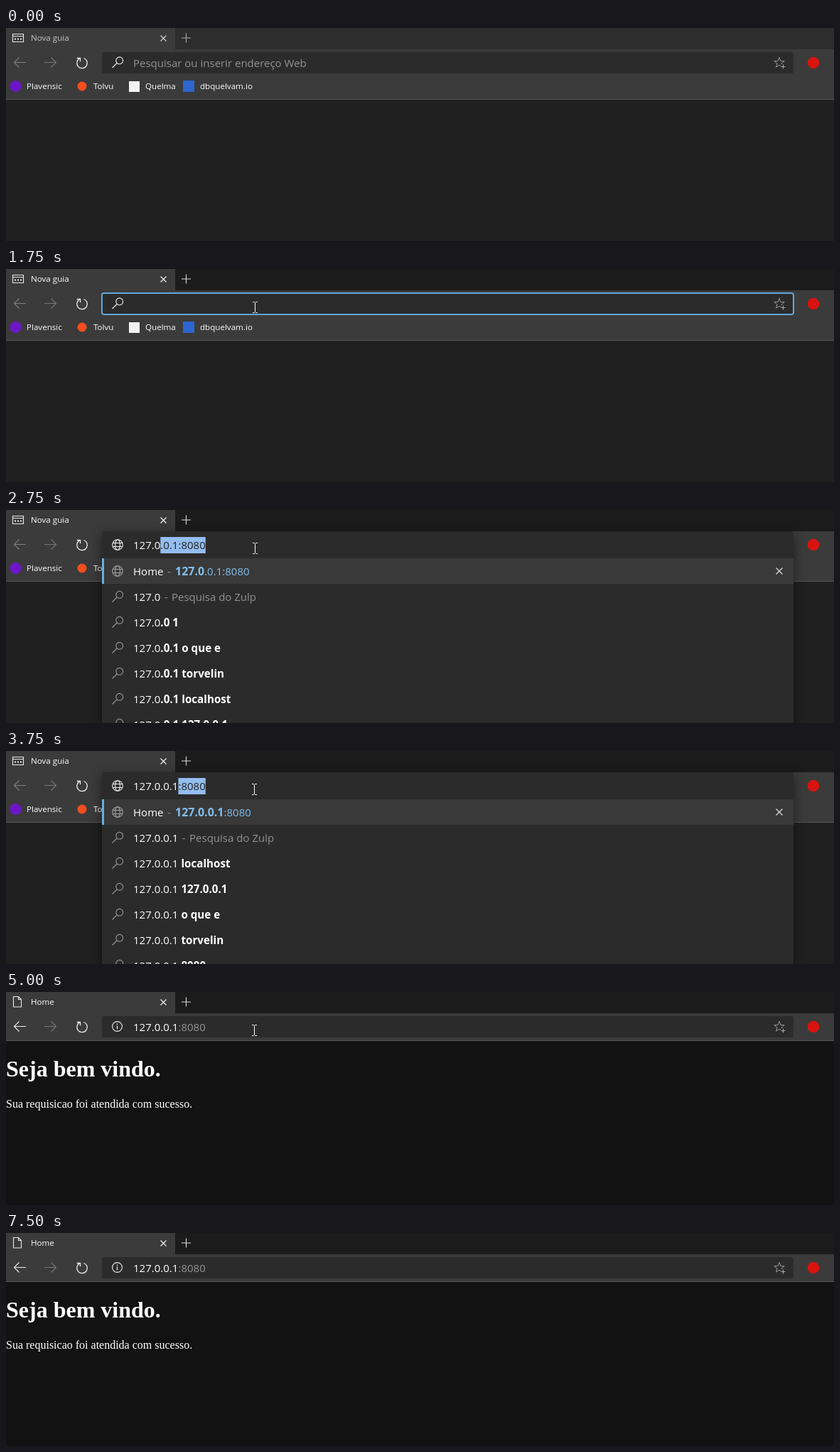
Animation of 1165x300 px, one loop 8 s. Source, as an HTML page:

```html
<!DOCTYPE html>
<html lang="pt">
<head>
<meta charset="utf-8">
<title>Nova guia</title>
<style>
  html, body { margin: 0; width: 100%; height: 100%; overflow: hidden; background: #202020; }
  svg { display: block; }
  text { font: 15px "Open Sans", "Noto Sans", sans-serif; fill: #fff; white-space: pre; }
  .small { font-size: 11.6px; }
  .bold { font-size: 15.2px; font-weight: 700; }
  .link { fill: #83bfee; }
  .link.bold { font-size: 16px; }
  .dim { fill: #929292; }
  .serif { font-family: "Liberation Serif", serif; font-size: 16px; }
  .title { font-size: 32px; font-weight: 700; }
  .menu { filter: drop-shadow(0 4px 8px rgba(0, 0, 0, .5)); }
</style>
</head>
<body>
<svg id="stage" width="1165" height="300" viewBox="0 0 1165 300"></svg>
<script>
const LOOP = 8000;
const HOST = '127.0.0.1', PORT = ':8080', URL_TEXT = HOST + PORT;
const stage = document.getElementById('stage');

const withHost = words => words.map(w => HOST + ' ' + w);
const early = ['127.0.0 1', ...withHost(['o que e', 'torvelin', 'localhost', HOST])];
const middle = [HOST, ...withHost(['8080', 'o que e', 'localhost', HOST])];
const late = withHost(['localhost', HOST, 'o que e', 'torvelin', '8080']);

const arrow = (x, y) => ({ kind: 'arrow', x, y });
const beam = (x, y) => ({ kind: 'beam', x, y });

// Each step changes the state left by the one before it.
const steps = [
  [0, { active: false, hover: false, focus: false, caret: false, typed: '', list: null,
        loading: false, loaded: false, pointer: null }],
  [500, { pointer: arrow(423, 185) }],
  [750, { pointer: beam(366, 57), hover: true }],
  [1000, { pointer: beam(340, 54) }],
  [1250, { pointer: beam(350, 54), hover: false, active: true, focus: true, caret: true }],
  [1750, { caret: false }],
  [2250, { typed: '1', list: [HOST, HOST + ' localhost'] }],
  [2500, { typed: '127' }],
  [2750, { typed: '127.0', list: early }],
  [3000, { typed: '127.0.' }],
  [3250, { typed: '127.0.0.' }],
  [3500, { list: middle }],
  [3750, { typed: HOST, list: late, pointer: beam(349, 54) }],
  [4000, { list: withHost(['8080', HOST, 'localhost']) }],
  [4250, { typed: URL_TEXT, list: [], caret: true }],
  [4750, { loading: true, caret: false }],
  [5000, { loading: false, loaded: true, list: null, focus: false }],
  [6500, { pointer: beam(352, 60), hover: true }],
  [6750, { pointer: arrow(361, 115), hover: false }],
  [7000, { pointer: arrow(450, 219) }],
  [7250, { pointer: null }]
];

let last = {};
const states = steps.map(([at, change]) => (last = { ...last, ...change, at }));

const box = (x, y, w, h, fill, extra = '') =>
  `<rect x="${x}" y="${y}" width="${w}" height="${h}" fill="${fill}" ${extra}/>`;
const dot = (x, y, r, fill) => `<circle cx="${x}" cy="${y}" r="${r}" fill="${fill}"/>`;
const line = (d, color, width = 1.1) =>
  `<path d="${d}" fill="none" stroke="${color}" stroke-width="${width}"/>`;
const text = (x, y, body, cls = '', extra = '') =>
  `<text x="${x}" y="${y}" class="${cls}" ${extra}>${body}</text>`;
const span = (body, cls) => `<tspan class="${cls}">${body}</tspan>`;
const dash = '<tspan class="dim" dx="1.5"> - </tspan>';

const cross = (x, y, r, color) =>
  line(`M${x - r} ${y - r}l${2 * r} ${2 * r}m0 ${-2 * r}l${-2 * r} ${2 * r}`, color, 1.2);
const lens = (x, y, color) =>
  line(`M${x - 1} ${y + 1}L${x - 7.5} ${y + 7.5}`, color) +
  `<circle cx="${x + 2.7}" cy="${y - 2.7}" r="4.9" fill="none" stroke="${color}" stroke-width="1.1"/>`;
const globe = (x, y, color) =>
  `<g fill="none" stroke="${color}" stroke-width="1.1"><circle cx="${x}" cy="${y}" r="7.3"/>` +
  `<ellipse cx="${x}" cy="${y}" rx="3.4" ry="7.3"/>` +
  `<path d="M${x - 6.8} ${y - 2.5}h13.6m0 5h-13.6"/></g>`;
const info = (x, y) =>
  `<circle cx="${x}" cy="${y}" r="6.9" fill="none" stroke="#eee" stroke-width="1.1"/>` +
  line(`M${x} ${y - 1}v4.8m0 -7.8v1.6`, '#eee', 1.3);

function star(x, y) {
  let d = '';
  for (let i = 0; i < 10; i++) {
    const r = i % 2 ? 3.2 : 7.6, a = (i / 5 - 0.5) * Math.PI;
    d += (i ? 'L' : 'M') + (x + r * Math.cos(a)).toFixed(1) + ' ' + (y + r * Math.sin(a)).toFixed(1);
  }
  return line(d + 'Z', '#999', 1) + box(x + 2.5, y + 2, 6, 6.5, '#2b2b2b') +
    line(`M${x + 5.5} ${y + 2.5}v6m-3 -3h6`, '#aaa');
}

function tabs(s) {
  const ink = s.active ? '#fff' : '#c8c8c8';
  let out = box(0, 0, 1165, 30, s.active ? '#1b1b1b' : '#2d2d2d') + box(0, 0, 238, 30, '#3b3b3b');
  if (s.loaded) out += line('M10.5 6.5h7l4 4v10.500h-11zM17.500 6.500v4h4', '#e8e8e8');
  else if (!s.loading)
    out += line('M9.5 8.500h15v11h-15zM9.500 11.500h15', '#e8e8e8') +
      [13, 17, 21].map(x => box(x - 1, 14.5, 2, 2, '#e8e8e8')).join('');
  return out + text(35, 18, s.loaded ? 'Home' : 'Nova guia', 'small', `style="fill:${ink}"`) +
    cross(221.5, 14.5, 4, s.active ? '#eee' : '#ccc') +
    line('M253.500 7.500v13m-6.500 -6.500h13', s.active ? '#ddd' : '#aaa');
}

function toolbar(s) {
  const end = s.loaded ? 68 : 100;
  let out = box(0, 30, 1165, end - 30, '#3b3b3b') + box(0, end, 1165, 1, '#575757') +
    line('M28 48.500H11.500m7 -7l-7 7l7 7', s.loaded ? '#f0f0f0' : '#808080') +
    line('M54 48.500h16.500m-7 -7l7 7l-7 7', '#777');
  out += s.loading ? cross(107, 49, 5.5, '#eee')
    : line('M109.500 42.500A7.300 7.300 0 1 1 103.500 43M99.800 42.500h4.700v4.700', '#eee', 1.3);
  return out + dot(1136, 49, 8.3, '#d8140f');
}

function bookmarks() {
  return dot(13.5, 82, 8, '#6d16c9') + text(29, 86, 'Plavensic', 'small') +
    dot(107, 82, 6.5, '#f24e1e') + text(123, 86, 'Tolvu', 'small') +
    box(173, 75, 15, 15, '#f2f2f2') + text(196, 86, 'Quelma', 'small') +
    box(249, 74, 16, 16, '#2b67cf') + text(273, 86, 'dbquelvam.io', 'small');
}

function suggestion(item, i, typed) {
  let n = 0;
  while (n < typed.length && item[n] === typed[n]) n++;
  const y = 158 + 36 * i;
  return lens(157, y, '#999') + text(179, y + 5.5, item.slice(0, n) + span(item.slice(n), 'bold'));
}

function menu(s) {
  const bottom = 148 + 36 * s.list.length;
  return box(135, 30, 973, bottom - 30, '#2b2b2b', 'rx="3" class="menu"') +
    box(135, 68, 973, 36, '#393939') + box(135, 68, 3, 36, '#69aede') +
    globe(157, 86, '#a0a0a0') + text(179, 91.5, 'Home' + dash) +
    text(238, 91.5, span(s.typed, 'link bold') + span(URL_TEXT.slice(s.typed.length), 'link')) +
    cross(1088, 86, 4.5, '#ddd') +
    lens(157, 122, '#999') + text(179, 127.5, s.typed + dash + span('<tspan dx="1.5">Pesquisa</tspan> do Zulp', 'dim')) +
    s.list.map((item, i) => suggestion(item, i, s.typed)).join('');
}

function addressBar(s) {
  let out = '';
  if (s.list) out += menu(s);
  else if (s.focus) out += box(135, 34, 973, 30, '#2b2b2b', 'rx="3" stroke="#62a8db" stroke-width="2"');
  else out += box(135, 34, 973, 30, s.hover ? '#333' : '#2b2b2b', 'rx="3"');

  if (s.loading || s.loaded) out += info(156.5, 48.5) + text(179, 55, HOST + span(PORT, 'dim'));
  else if (s.list)
    out += globe(157, 49, '#f0f0f0') + '<rect id="mark" y="38" height="23" fill="#94bdf0"/>' +
      text(179, 55, `<tspan id="typed">${s.typed}</tspan>` +
        `<tspan id="rest" fill="#222">${URL_TEXT.slice(s.typed.length)}</tspan>`);
  else {
    out += lens(157, 48.5, '#eee');
    if (!s.focus) out += text(179, 55, 'Pesquisar ou inserir endereço Web', 'dim');
  }
  if (!s.list || s.loading) out += star(1088, 49);
  if (s.caret) out += box(s.typed ? 280 : 179, 37, 1, 22, '#fff');
  return out;
}

function page(s) {
  if (!s.loaded) return box(0, 101, 1165, 199, '#202020');
  return box(0, 69, 1165, 231, '#121212') +
    text(0, 119, 'Seja bem vindo.', 'serif title') +
    text(0, 163, 'Sua requisicao foi atendida com sucesso.', 'serif');
}

function pointer(p) {
  if (!p) return '';
  const shape = p.kind === 'arrow'
    ? '<path d="M.5 .5V16.500L4.200 13L6.700 18.500L9 17.500L6.600 12H11.500Z" fill="#fff" stroke="#000"/>'
    : line('M-3 -7.500h2.500l1 1l1 -1h2.500M.5 -6.500v13M-3 7.500h2.500l1 -1l1 1h2.500', '#fff', 1);
  return `<g transform="translate(${p.x} ${p.y})">${shape}</g>`;
}

function draw(s) {
  stage.innerHTML = page(s) + tabs(s) + toolbar(s) + (s.loaded ? '' : bookmarks()) +
    addressBar(s) + pointer(s.pointer);
  const mark = document.getElementById('mark');
  if (!mark) return;
  const size = id => document.getElementById(id).getComputedTextLength();
  mark.setAttribute('x', 179 + size('typed'));
  mark.setAttribute('width', s.typed === URL_TEXT ? 0 : size('rest'));
}

const start = performance.now();
let shown = null;
function tick() {
  const t = (performance.now() - start) % LOOP;
  const state = states.filter(s => s.at <= t).pop();
  if (state !== shown) draw(shown = state);
  requestAnimationFrame(tick);
}
tick();
</script>
</body>
</html>
```
